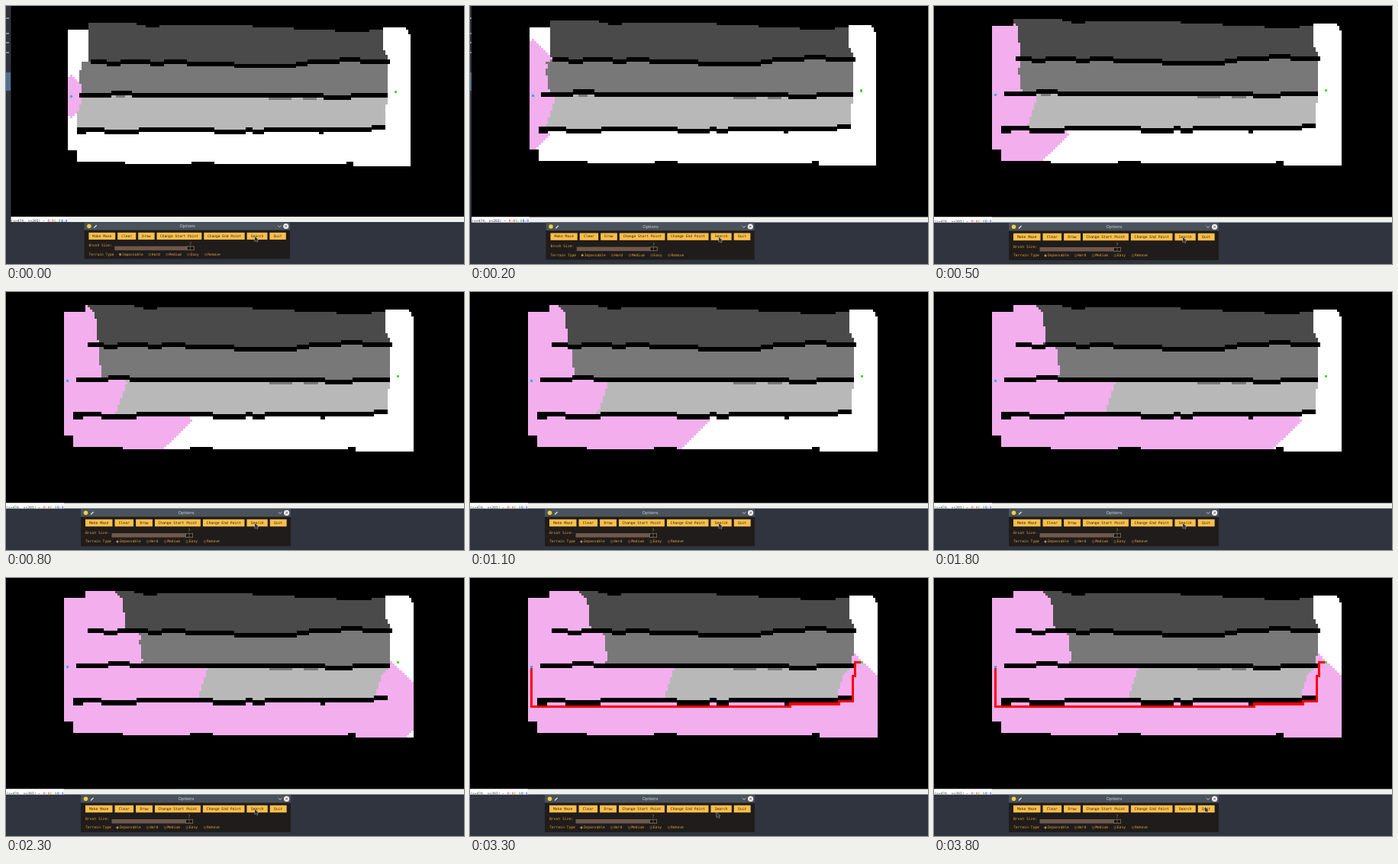
These frames come from a looping animation (600x338 px, 3900 ms). An HTML page with a canvas:

```html
<!DOCTYPE html>
<html>
<head>
<meta charset="utf-8">
<style>
html, body { margin: 0; width: 600px; height: 338px; overflow: hidden; background: #2f343f; }
canvas { display: block; }
</style>
</head>
<body>
<canvas id="stage" width="600" height="338"></canvas>
<script>
const ctx = document.getElementById('stage').getContext('2d');
const LOOP = 3900, STEP = 100, CELL = 3.05, TOP = 1.8;
const COLS = 180, ROWS = 72;
const START = [26, 37], GOAL = [168, 35];
// Terrain is stored as its travel cost.
const WALL = 0, OPEN = 1, EASY = 3, MEDIUM = 6, HARD = 9;
const COLORS = { [WALL]: '#000', [OPEN]: '#fff', [EASY]: '#b8b8b8', [MEDIUM]: '#787878', [HARD]: '#4a4a4a' };
const PINK = '#f3aeee';

// Linear interpolation between [position, value] keys.
function track(keys, at) {
  let i = 1;
  while (i < keys.length - 1 && keys[i][0] < at) i++;
  const [x0, v0] = keys[i - 1], [x1, v1] = keys[i];
  return v0 + (v1 - v0) * Math.min(1, Math.max(0, (at - x0) / (x1 - x0)));
}

const bump = (x, center, radius) => Math.abs(x + 0.5 - center) < radius ? 1 : 0;

// Row of each hand-drawn contour at a given column.
const roof = x => Math.round(
  track([[34, 5], [54, 5.4], [57, 6], [104, 6.4], [150, 9], [162, 8]], x) + bump(x, 62, 3));
const upper = x => Math.round(
  track([[35, 21.3], [70, 21.3], [88, 22], [115, 23.3], [145, 20.4], [166, 21]], x) +
  0.4 * Math.sin(2 * Math.PI * (x - 39.5) / 19));
const middle = x => 36 - bump(x, 48.5, 4.5) + bump(x, 143, 6);
const lower = x => 51 + bump(x, 48.5, 7.5) + bump(x, 96, 7) + bump(x, 108.5, 2.5) - bump(x, 161, 3);
const floor = x => 66 + bump(x, 64.5, 14.5) + bump(x, 118, 29) + 2 * (x >= 150);

const grid = new Uint8Array(COLS * ROWS);

// Fills columns x0..x1 over the row range that rows(x) returns.
function band(x0, x1, rows, cost) {
  for (let x = x0; x < x1; x++) {
    const [top, bottom] = rows(x);
    for (let y = top; y < bottom; y++) grid[y * COLS + x] = cost;
  }
}

function buildMaze() {
  band(25, 29, () => [8, 61], OPEN);
  band(29, 163, x => [8, floor(x)], OPEN);
  band(163, 175, x => [7 + (x > 172) + 2 * (x > 173), floor(x)], OPEN);
  band(34, 163, x => [0, roof(x)], WALL);
  band(34, 163, x => [roof(x), upper(x) + 1], HARD);
  band(163, 165, x => [2 * x - 309, upper(x)], HARD);
  band(31, 165, x => [upper(x) + 1, middle(x)], MEDIUM);
  band(30, 31, x => [26, middle(x)], MEDIUM);
  band(29, 164, x => [middle(x) + 1, lower(x) + 1], EASY);
  band(164, 165, x => [middle(x) + 1, 41], EASY);

  band(46, 50, () => [37, 38], MEDIUM);
  band(113, 123, () => [38, 39], MEDIUM);
  band(128, 134, () => [38, 39], MEDIUM);

  band(35, 166, x => [upper(x), upper(x) + 2], WALL);
  band(30, 165, x => [middle(x), middle(x) + 2], WALL);
  band(29, 164, x => [lower(x), lower(x) + 2 + bump(x, 31, 2) + bump(x, 136, 1)], WALL);
}

const cellAt = ([x, y]) => y * COLS + x;

// Dijkstra with one bucket per integer distance.
// opened holds the distance at which a cell first joins the frontier.
function search() {
  const dist = [], opened = [];
  const buckets = [[cellAt(START)]];
  for (let d = 0; d <= 180; d++) {
    for (const cell of buckets[d] || []) {
      if (cell in dist) continue;
      dist[cell] = d;
      for (const step of [1, -1, COLS, -COLS]) {
        const next = cell + step, cost = grid[next];
        if (!cost) continue;
        opened[next] ??= d;
        (buckets[d + cost] ||= []).push(next);
      }
    }
  }
  return { dist, opened };
}

function traceBack(dist) {
  const route = [];
  let cell = cellAt(GOAL);
  while (cell !== undefined) {
    route.push(cell);
    const before = dist[cell] - grid[cell];
    const step = [-1, COLS, -COLS, 1].find(s => dist[cell + s] === before);
    cell = step && cell + step;
  }
  return route;
}

buildMaze();
const { dist, opened } = search();
const route = traceBack(dist);
const map = document.createElement('canvas');
map.width = COLS;
map.height = ROWS;
const mapCtx = map.getContext('2d');

function box(x, y, w, h, color) {
  ctx.fillStyle = color;
  ctx.fillRect(x, y, w, h);
}

function disc(x, y, r, color) {
  ctx.fillStyle = color;
  ctx.beginPath();
  ctx.arc(x, y, r, 0, 7);
  ctx.fill();
}

function line(points, color, width) {
  ctx.strokeStyle = color;
  ctx.lineWidth = width;
  ctx.beginPath();
  points.forEach(([x, y]) => ctx.lineTo(x, y));
  ctx.stroke();
}

function label(text, x, y, color, align = 'left', font = '4.7px "DejaVu Sans Mono", monospace') {
  ctx.font = font;
  ctx.textAlign = align;
  ctx.textBaseline = 'middle';
  ctx.fillStyle = color;
  ctx.fillText(text, x, y);
}

function drawMaze(t) {
  const reach = track([[0, 8], [500, 47.4], [1100, 92], [1800, 147], [2350, 177]], t);
  const trail = track([[2377, 0], [2814, route.length]], t);
  const plot = (cell, color) => {
    mapCtx.fillStyle = color;
    mapCtx.fillRect(cell % COLS, Math.floor(cell / COLS), 1, 1);
  };
  grid.forEach((cost, cell) => plot(cell, opened[cell] <= reach ? PINK : COLORS[cost]));
  route.slice(0, trail).forEach(cell => plot(cell, '#f00'));
  plot(cellAt(START), '#1cb4dc');
  plot(cellAt(GOAL), '#4fd83a');

  box(0, -10, 640, 286.6, '#000');
  ctx.imageSmoothingEnabled = false;
  ctx.drawImage(map, 0, TOP, COLS * CELL, ROWS * CELL);
}

function drawStatus() {
  ctx.save();
  ctx.beginPath();
  ctx.rect(0, 276.6, 640, 7);
  ctx.clip();
  box(0, 276, 640, 8, '#eef0ee');
  box(0, 276, 76, 8, '#fff');
  label('(x=474, y=203) ~', 0, 282.4, '#333');
  label('R:0', 49, 282.4, '#d22');
  label('G:0', 58, 282.4, '#2a2');
  label('B:0', 67, 282.4, '#22d');
  ctx.restore();
}

function drawOptions() {
  const amber = '#d9a440', body = '#201c1b', charWidth = 2.72;
  box(98, 284, 275, 49, body);
  box(98, 284, 275, 10.5, '#4a525c');
  disc(104.5, 289.3, 2.8, '#f2cf3a');
  line([[111, 291.5], [114.5, 288]], '#e8e8e8', 1.2);
  label('Options', 236, 289.5, '#d5d8dc', 'center', '5.6px "Noto Sans", sans-serif');
  line([[356.7, 288.3], [359, 290.5], [361.3, 288.3]], '#e0e0e0', 0.8);
  disc(367.6, 289.3, 3.6, '#f4f4f4');
  for (const dy of [1.4, -1.4]) line([[366.2, 289.3 - dy], [369, 289.3 + dy]], '#444', 0.8);

  let x = 104;
  for (const text of ['Make Maze', 'Clear', 'Draw', 'Change Start Point', 'Change End Point', 'Search', 'Quit']) {
    const width = text.length * charWidth + 11;
    box(x, 297.8, width, 9.4, '#fdbf4a');
    label(text, x + width / 2, 302.6, '#2b2116', 'center');
    x += width + 3;
  }

  label('Brush Size:', 104, 315.5, amber);
  label('7', 240, 313, amber, 'center');
  box(138.5, 316, 106.5, 5.5, '#6e574b');
  box(235, 316, 10, 5.5, '#8d7b6c');
  for (const left of [235.7, 240.3]) box(left, 316.7, 4, 4.1, '#18140f');

  label('Terrain Type', 104, 327, amber);
  x = 146;
  for (const text of ['Impassable', 'Hard', 'Medium', 'Easy', 'Remove']) {
    disc(x, 327, 1.7, '#80693f');
    disc(x, 327, 1.1, text === 'Impassable' ? '#c9a050' : body);
    label(text, x + 2.5, 327, amber);
    x += text.length * charWidth + 12.3;
  }
}

function drawPointer(t) {
  const x = track([[2500, 326], [2800, 323], [3400, 323], [3700, 355]], t);
  const y = track([[2500, 303], [2800, 307], [3400, 307], [3700, 300]], t);
  const shape = [[0, 0], [0, 6.5], [1.6, 5.2], [2.8, 7.4], [3.8, 6.8], [2.8, 4.8], [4.8, 4.6], [0, 0]];
  line(shape.map(([dx, dy]) => [x + dx, y + dy]), '#c8ccd2', 0.8);
  ctx.fillStyle = '#30343c';
  ctx.fill();
}

function drawDesktop() {
  box(0, 0, 600, 338, '#2f343f');
  box(0, 87, 6, 24, '#4f7092');
  for (const y of [15, 35, 47, 60]) box(0, y, 4, 2, '#858b96');
}

function draw(t) {
  const zoom = Math.max(0, 1 - t / 300);
  ctx.setTransform(1, 0, 0, 1, 0, 0);
  drawDesktop();
  ctx.translate(6.5 * zoom, 5 * zoom);
  ctx.scale(1 - 0.02 * zoom, 1 - 0.02 * zoom);
  box(0, 276, 640, 80, '#2f343f');
  drawMaze(t);
  drawStatus();
  drawOptions();
  drawPointer(t);
}

let shown = -1;
function tick() {
  const t = Math.floor(performance.now() % LOOP / STEP) * STEP;
  if (t !== shown) draw(shown = t);
  requestAnimationFrame(tick);
}
tick();
</script>
</body>
</html>
```
